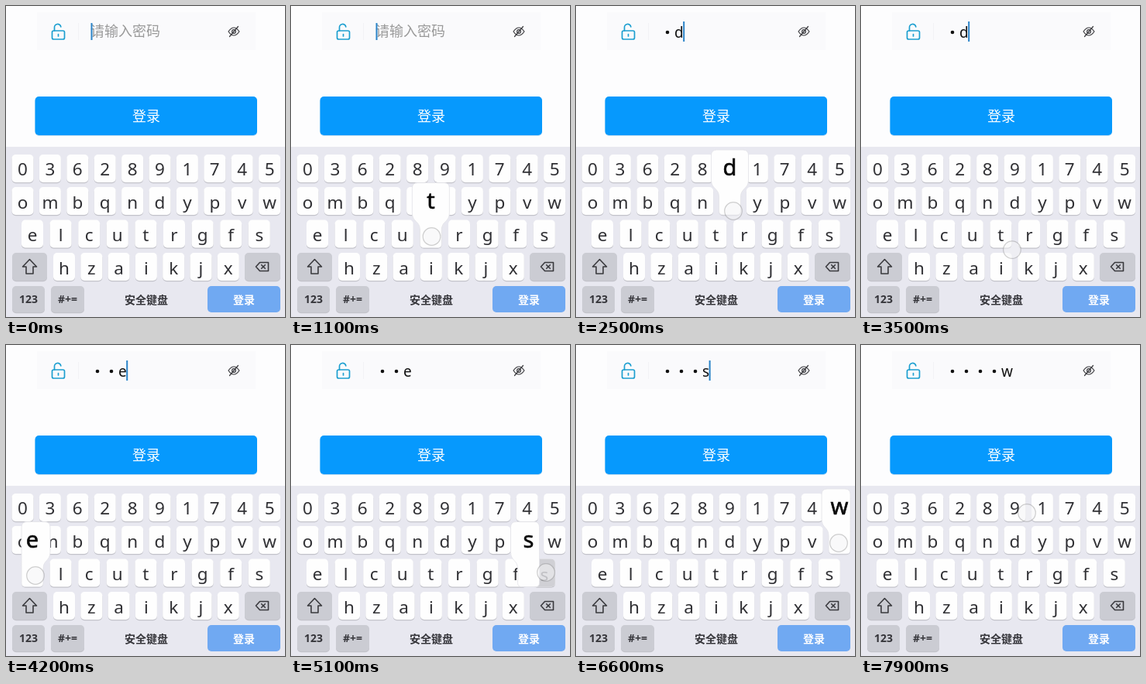
These frames come from a looping animation (360 by 402 pixels, 8 s). An HTML page:

```html
<!DOCTYPE html>
<html lang="zh">
<head>
<meta charset="utf-8">
<title>安全键盘</title>
<style>
  html, body { margin: 0; width: 100%; height: 100%; overflow: hidden; background: #fdfdfe; }
  svg { display: block; width: 360px; height: 402px; }
  text { font-family: "Noto Sans", "Noto Sans CJK SC", "Noto Sans CJK", sans-serif; }
  .key { fill: #fefefe; }
  .edge { fill: #c3c3ca; }
  .grey { fill: #cbccd3; }
  .label { font-size: 22.5px; fill: #303034; text-anchor: middle; }
  .small { font-size: 14px; font-weight: 700; fill: #36363b; text-anchor: middle; }
  .line { fill: none; stroke-linecap: round; stroke-linejoin: round; }
  .typed { font-size: 19px; fill: #111; }
</style>
</head>
<body>
<svg id="stage" viewBox="0 0 360 402">
  <rect width="360" height="402" fill="#fdfdfe"/>

  <rect x="40" y="8" width="282" height="49" fill="#fafafc"/>
  <g class="line" stroke="#1c9fd0" stroke-width="1.700">
    <rect x="59.500" y="32" width="16" height="11" rx="2"/>
    <path d="M62.500 32V28a4.200 4.200 0 0 1 8.300 -1.200M67.500 36.500v2.500"/>
  </g>
  <path d="M93.500 22V44" stroke="#f2f2f5"/>
  <g class="line" stroke="#3a3a3e" stroke-width="1.200">
    <path d="M287 33Q294 23 301 33Q294 43 287 33ZM299.500 26.500L288.500 39.500"/>
    <circle cx="294" cy="33" r="2.400"/>
  </g>

  <text id="hint" x="109" y="39" font-size="18" fill="#999">请输入密码</text>
  <g id="dots" fill="#111"></g>
  <text id="last" class="typed" y="40.700"></text>
  <rect id="caret" width="2" fill="#2a83c8"/>

  <rect x="37.500" y="118" width="286.500" height="50" rx="5" fill="#b9d9f0"/>
  <rect x="37.500" y="117" width="286.500" height="50" rx="5" fill="#0699fd"/>
  <text x="181" y="148.500" font-size="18" fill="#fff" text-anchor="middle">登录</text>

  <rect y="182" width="360" height="220" fill="#e8e8f0"/>
  <g id="keys"></g>
  <g class="line" stroke="#3a3a3e" stroke-width="1.600">
    <path d="M30.500 327.500L39.500 337H35V346H26V337H21.500Z"/>
    <path d="M327.500 331.500H338.500V342.500H327.500L322.500 337ZM329.700 334.700L334.300 339.300M334.300 334.700L329.700 339.300"/>
  </g>

  <g id="pressed">
    <rect width="28" height="36" rx="5" fill="#d0d0d5"/>
    <text id="pressedLabel" class="label" x="14" y="28" style="fill:#8c8c92"></text>
  </g>
  <g id="popup">
    <path id="bubble" fill="#fefefe" stroke="#e2e2e8" stroke-width=".8"/>
    <text id="big" y="-15" font-size="29" text-anchor="middle" fill="#080808" stroke="#080808" stroke-width=".6"></text>
  </g>
  <circle id="finger" r="11.300" fill="#f4f4f6" fill-opacity=".5" stroke="#787878" stroke-opacity=".35" stroke-width="1.200"/>
</svg>

<script>
const LOOP = 8000, STEP = 100;
const LINGER = 200, REVEAL = 1500, BLINK = 500, CARET_END = 7300;
const $ = id => document.getElementById(id);
const keys = $('keys');

function add(parent, tag, attrs, content = '') {
  const el = document.createElementNS('http://www.w3.org/2000/svg', tag);
  for (const name in attrs) el.setAttribute(name, attrs[name]);
  el.textContent = content;
  parent.append(el);
  return el;
}

function addKey(x, y, width, height = 36, style = 'key') {
  add(keys, 'rect', { x, y: y + 1.2, width, height, rx: 5, class: 'edge' });
  add(keys, 'rect', { x, y, width, height, rx: 5, class: style });
}

// Letter rows: labels, first centre, spacing, top
const rows = [
  ['0362891745', 21.5, 35.4, 192],
  ['ombqndypvw', 21.5, 35.4, 234],
  ['elcutrgfs', 34, 36.6, 276.5],
  ['hzaikjx', 75, 35.3, 319]
];
for (const [letters, first, gap, top] of rows) {
  [...letters].forEach((letter, i) => {
    const x = first + i * gap;
    addKey(x - 14, top, 28);
    add(keys, 'text', { x, y: top + (top < 200 ? 26.5 : 27.5), class: 'label' }, letter);
  });
}
addKey(8, 319, 45, 36, 'grey');
addKey(308, 319, 46, 36, 'grey');
addKey(8, 362, 42, 34, 'grey');
addKey(58, 362, 43, 34, 'grey');
add(keys, 'rect', { x: 260, y: 362, width: 94, height: 34, rx: 5, fill: '#70a9f2' });
for (const [x, label, fill] of [[29, '123'], [79.5, '#+='], [181, '安全键盘'], [307, '登录', '#fff']]) {
  const el = add(keys, 'text', { x, y: x < 100 ? 384 : 385, class: 'small' }, label);
  if (fill) el.style.fill = fill;
}

const dots = Array.from({ length: 4 }, (_, i) =>
  add($('dots'), 'circle', { cx: 118 + 18 * i, cy: 34, r: 2.3 }));

// x: key centre, px: popup centre, left/right: how far the bubble overhangs the key
const presses = [
  { key: 't', down: 1000, up: 1500, x: 180.4, px: 180.4, top: 276.5, left: 10, right: 10 },
  { key: 'd', down: 2000, up: 2400, x: 198.5, px: 198.5, top: 234, left: 10, right: 10 },
  { key: 'e', down: 3800, up: 4200, x: 34, px: 34, top: 276.5, left: 0, right: 9 },
  { key: 's', down: 5000, up: 5600, x: 326.8, px: 306.5, top: 276.5, left: 9, right: 0 },
  { key: 'w', down: 6200, up: 6800, x: 340, px: 340, top: 234, left: 9, right: 0 }
];

// Time, x, y, sag of the way there
const path = [
  [1000, 181.5, 298, 0], [1500, 181.5, 298, 0], [1800, 208, 266, 0],
  [2000, 203, 265, 0], [2500, 203, 265, 0], [2700, 224, 268, 0],
  [3400, 224, 268, 0], [3800, 38, 298, 90], [4200, 38, 298, 0],
  [4500, 92, 298, 0], [4700, 92, 298, 0], [5000, 329, 294, 80],
  [5600, 329, 294, 0], [6000, 339, 256, 0], [6800, 339, 256, 0],
  [7300, 209, 226, 0], [7500, 209, 226, 0], [7900, 214, 217, 0], [8000, 214, 217, 0]
];

function fingerAt(t) {
  const i = path.findIndex(p => p[0] > t);
  const [t0, x0, y0] = path[i - 1], [t1, x1, y1, sag] = path[i];
  const u = (t - t0) / (t1 - t0);
  const ease = u * u * (3 - 2 * u);
  return [x0 + (x1 - x0) * ease, y0 + (y1 - y0) * ease + sag * Math.sin(Math.PI * ease)];
}

function bubblePath(left, right) {
  const l = -14 - left, r = 14 + right;
  return `M${l + 7} -48H${r - 7}Q${r} -48 ${r} -41V-9` +
    `C${r} 3 14 1 14 13V31Q14 36 9 36H-9Q-14 36 -14 31V13` +
    `C-14 1 ${l} 3 ${l} -9V-41Q${l} -48 ${l + 7} -48Z`;
}

function show(el, on) {
  el.setAttribute('visibility', on ? 'visible' : 'hidden');
}

function drawField(t) {
  const count = presses.filter(p => p.up <= t).length;
  const newest = presses[count - 1];
  const letter = newest && t < newest.up + REVEAL ? newest.key : '';
  const hidden = letter ? count - 1 : count;
  const x = 109 + 18 * hidden;
  show($('hint'), !count);
  dots.forEach((dot, i) => show(dot, i < hidden));
  $('last').setAttribute('x', x);
  $('last').textContent = letter;
  const width = letter ? $('last').getComputedTextLength() : 0;
  const caret = $('caret');
  caret.setAttribute('x', x + width + (count ? -0.5 : 0.5));
  caret.setAttribute('y', count ? 20 : 22);
  caret.setAttribute('height', count ? 26 : 22);
  const since = t - (newest ? newest.up : -300);
  show(caret, t < CARET_END && Math.floor(since / BLINK) % 2 === 0);
}

function drawPress(t) {
  const p = presses.find(q => t >= q.down && t < q.up + LINGER);
  show($('popup'), p);
  show($('pressed'), p && t < p.up);
  if (!p) return;
  $('pressed').setAttribute('transform', `translate(${p.x - 14} ${p.top})`);
  $('pressedLabel').textContent = p.key;
  $('popup').setAttribute('transform', `translate(${p.px} ${p.top})`);
  $('bubble').setAttribute('d', bubblePath(p.left, p.right));
  $('big').textContent = p.key;
}

function drawFinger(t) {
  const on = t >= path[0][0];
  show($('finger'), on);
  if (!on) return;
  const [x, y] = fingerAt(t);
  $('finger').setAttribute('cx', x);
  $('finger').setAttribute('cy', y);
}

const start = performance.now();
function frame() {
  const elapsed = (performance.now() - start) % LOOP;
  const t = Math.floor(elapsed / STEP) * STEP;
  drawField(t);
  drawPress(t);
  drawFinger(t);
  requestAnimationFrame(frame);
}
frame();
</script>
</body>
</html>
```
